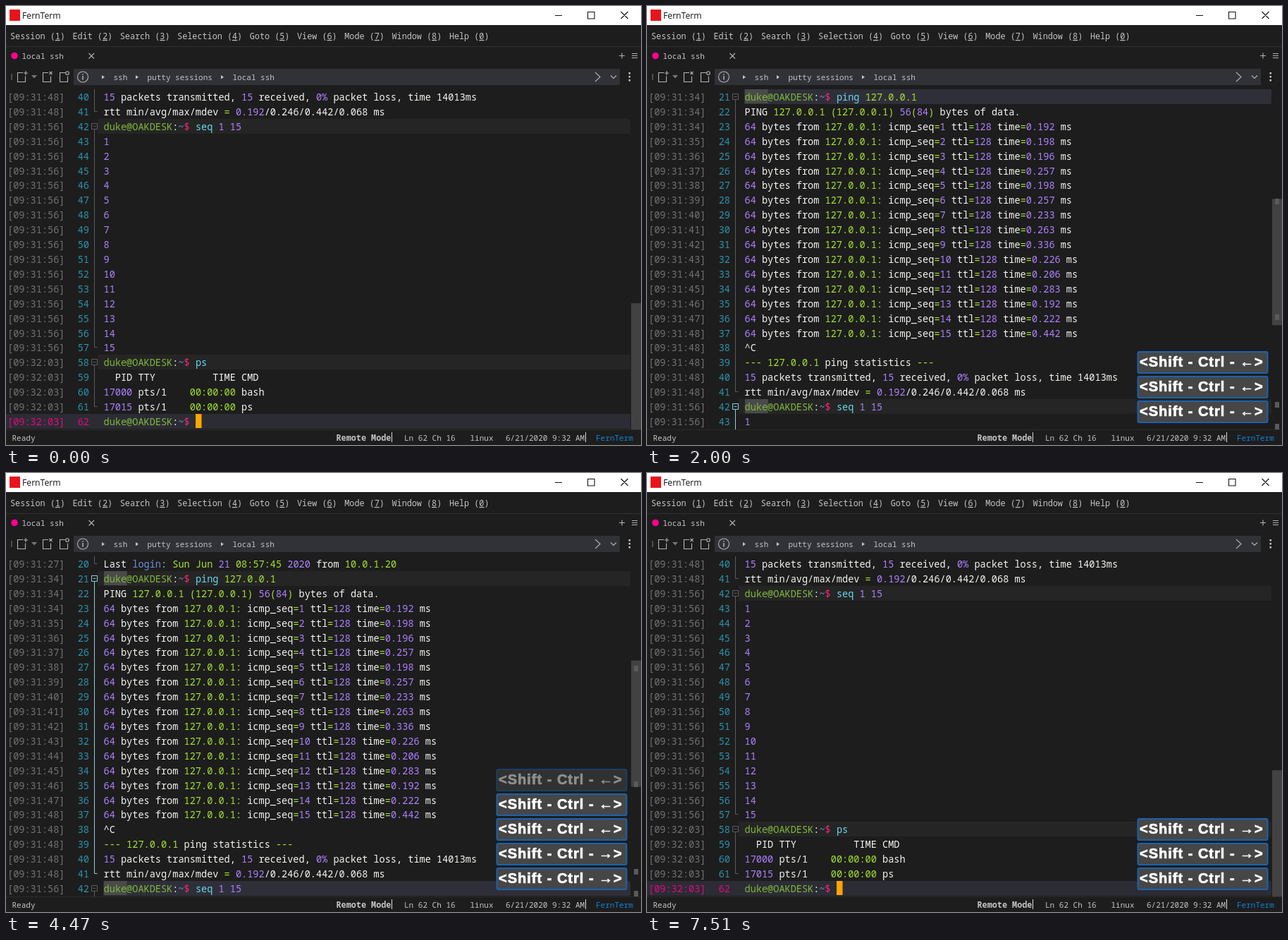
Recreate the animation shown at these times as an HTML page. Size 901 by 622 pixels, loop 7990 ms.

```html
<!DOCTYPE html>
<html lang="en">
<head>
<meta charset="utf-8">
<style>
html, body { margin: 0; width: 100%; height: 100%; overflow: hidden; background: #1d1d1d; }
svg { display: block; }
text { font-family: "Noto Sans Mono", "DejaVu Sans Mono", monospace; font-size: 11px; fill: #c4c4c4; }
.row text { font-size: 13.59px; fill: #f4f4f0; }
.row .time { fill: #727272; }
.row .num { fill: #2b93ab; text-anchor: end; }
.row .now { fill: #e5087e; }
.p { fill: #ae81ff; } .g { fill: #a6e22e; } .c { fill: #66d9ef; } .r { fill: #f04444; }
.u { fill: #7fb83a; } .b { fill: #6a8fd8; } .k { fill: #f92672; } .d { fill: #3f7d35; }
.menu text { font-size: 11.8px; }
.pop text { font: bold 20px "Liberation Sans", Arial, sans-serif; letter-spacing: 1px; fill: #fff; stroke: #fff; stroke-width: .7; }
.pop tspan { font-weight: 400; }
.line { fill: none; stroke: #b4b4b4; stroke-width: 1.1; }
</style>
</head>
<body>
<svg id="stage" width="901" height="622" viewBox="0 0 901 622"></svg>
<script>
const LOOP = 7990, TOP = 118, ROW = 20.91, CHAR = 8.155, LEFT = 139, VISIBLE = 23;
const USER = 'duke', APP = 'FernTerm';

const rect = (x, y, w, h, fill, more = '') =>
  `<rect x="${x}" y="${y}" width="${w}" height="${h}" fill="${fill}" ${more}/>`;
const path = (d, more = '') => `<path class="line" d="${d}" ${more}/>`;
const text = (x, y, s, more = '') => `<text x="${x}" y="${y}" ${more}>${s}</text>`;

// [x:words] colours the words with class x
const paint = s => s.replace(/ /g, '\u00a0').replace(/\[(\w):(.*?)\]/g, '<tspan class="$1">$2</tspan>');

const prompt = cmd => `[u:${USER}@OAKDESK]:[b:~][k:$] ${cmd}`;
const pings = [192, 198, 196, 257, 198, 257, 233, 263, 336, 226, 206, 283, 192, 222, 442];

const lines = [
  'Welcome to Ubuntu [p:18.04.2] LTS [g:(]GNU/Linux 4.4.0-18362-Microsoft x86_64[g:)]',
  '',
  ' [g:*] Documentation:  [c:https://help.ubuntu.com]',
  ' [g:*] Management:     [c:https://landscape.canonical.com]',
  ' [g:*] Support:        [c:https://ubuntu.com/advantage]',
  '',
  '  System information as of [g:Sun Jun] [p:21] [g:09:31:26] CST [p:2020]',
  '',
  '  System load:    [p:0.52]      Memory usage: [p:75%]   Processes:       [p:12]',
  '  Usage of /home: [r:unknown]   Swap usage:   [p:11%]   Users logged in: [p:0]',
  '',
  '  [g:=>] There were exceptions while processing one or more plugins. See',
  '     /var/log/landscape/sysinfo.log for more information.',
  '', '',
  '[p:156] packages [d:can be] updated.',
  '[p:87] updates are security updates.',
  '', '',
  'Last [b:login][c::] [g:Sun Jun] [p:21] [g:08:57:45] [p:2020] from [g:10.0.1.20]',
  prompt('[c:ping] [g:127.0.0.1]'),
  'PING [g:127.0.0.1 (127.0.0.1)] [p:56][g:(][p:84][g:)] bytes of data.',
  ...pings.map((ms, i) =>
    `[p:64] bytes from [g:127.0.0.1:] icmp_seq[g:=][p:${i + 1}] ttl[g:=][p:128] time[g:=][p:0.${ms}] ms`),
  '^C',
  '[g:---] [g:127.0.0.1] ping statistics [g:---]',
  '[p:15] packets transmitted, [p:15] received, [p:0%] packet loss, time 14013ms',
  'rtt min/avg/max/mdev [g:=] [p:0.192]/0.246/0.442/0.068 ms',
  prompt('[c:seq] [p:1 15]'),
  ...pings.map((_, i) => `[p:${i + 1}]`),
  prompt('[c:ps]'),
  '  PID TTY          TIME CMD',
  '[p:17000] pts/1    [g:00:00:00] bash',
  '[p:17015] pts/1    [g:00:00:00] ps',
  prompt('')
];

const prompts = [21, 42, 58, 62];
const blocks = [[1, 20], [21, 41], [42, 57], [58, 61]];

function clock(n) {
  if (n > 57) return '09:32:03';
  const s = n < 21 ? 27 : n < 24 ? 34 : n < 38 ? n + 11 : n < 42 ? 48 : 56;
  return '09:31:' + s;
}

// first: top line, sel: chosen line, fold: lit block, word: marked word,
// marks: lines on the scrollbar, keys: pressed arrows ("." before a fading one)
const steps = [
  { at: 0, first: 40, sel: 62, fold: 0, word: '', marks: [], cursor: true, keys: '' },
  { at: 530, sel: 58, fold: 58, cursor: false },
  { at: 1020, word: USER, marks: prompts, cursor: true, keys: '←' },
  { at: 1510, sel: 42, fold: 42, keys: '←←' },
  { at: 2000, first: 21, sel: 21, keys: '←←←' },
  { at: 2530, fold: 21 },
  { at: 3010, first: 1, sel: 1, fold: 1, word: 'Welcome', keys: '←←←←' },
  { at: 3500, marks: [1], keys: '.←←←←' },
  { at: 3980, sel: 21, fold: 21, word: USER, keys: '←←←→' },
  { at: 4470, first: 20, sel: 42, marks: prompts, keys: '.←←←→→' },
  { at: 5000, fold: 42, keys: '.←←→→' },
  { at: 5500, keys: '←→→' },
  { at: 6010, first: 36, sel: 58, fold: 58, keys: '.←→→→' },
  { at: 6520, keys: '→→→' },
  { at: 6990, first: 40, sel: 62, fold: 0, word: '', marks: [21, 42, 58], keys: '.→→→→' },
  { at: 7510, marks: [], keys: '→→→' }
];
steps.forEach((s, i) => steps[i] = { ...steps[i - 1], ...s });

function drawRow(n, s) {
  const y = Math.round(TOP + (n - s.first) * ROW), base = y + 15.5;
  const last = n === lines.length, isPrompt = prompts.includes(n);
  let out = '';
  if (last) out += rect(0, y, 886, 21, '#2c2c35');
  else if (n === s.sel) out += rect(LEFT - 1, y, 748, 21, '#2f2f39');
  else if (isPrompt) out += rect(LEFT - 9, y, 756, 21, '#252525');
  if (s.word && (s.word === USER ? isPrompt : n === 1))
    out += rect(LEFT, y, s.word.length * CHAR, 20, '#4a4a4a');
  out += text(2, base, `[${clock(n)}]`, `class="time ${last ? 'now' : ''}"`);
  out += text(118, base, n, `class="num ${last ? 'now' : ''}"`);
  out += text(LEFT - .5, base, paint(lines[n - 1]));
  if (last && s.cursor) out += rect(269, y, 8.5, 20, '#ffa500');
  return out;
}

function drawFold([from, to], s) {
  const mid = n => Math.round(TOP + (n - s.first) * ROW + 10) + .5;
  const a = mid(from), b = mid(to);
  return path(`M121.5 ${a - 4}h8v8h-8zM123.5 ${a}h4M125.5 ${a + 4}V${b}h4`,
    `style="stroke:${from === s.fold ? '#8ed0d4' : '#5c5c5c'};stroke-width:1"`);
}

function drawScroll(s) {
  const unit = 482 / lines.length;
  return rect(887, TOP + (s.first - 1) * unit, 14, VISIBLE * unit, '#424242') +
    s.marks.map(n => rect(891, Math.round(TOP + (n - .5) * unit - 4), 6, 8, '#5a5a5a')).join('');
}

function drawKeys(s) {
  const keys = s.keys.match(/\.?[←→]/g) || [];
  return keys.map((key, i) => {
    const y = 559 - 35 * (keys.length - 1 - i), faded = key.length > 1;
    return `<g class="pop" opacity="${faded ? .5 : 1}">` +
      rect(696.5, y + 1, 184, 30, '#464646', 'rx="2" stroke="#1c62ad" stroke-width="2"') +
      text(699, y + 22, `&lt;Shift - Ctrl - <tspan>${key.at(-1)}</tspan>&gt;`) + '</g>';
  }).join('');
}

function drawTerminal(s) {
  let rows = '';
  for (let n = s.first; n < s.first + VISIBLE; n++) rows += drawRow(n, s);
  return `<g class="row">${rows}</g>` + blocks.map(b => drawFold(b, s)).join('') + drawScroll(s) + drawKeys(s);
}

function drawFrame() {
  let x = 6;
  const menu = ['Session', 'Edit', 'Search', 'Selection', 'Goto', 'View', 'Mode', 'Window', 'Help'].map((name, i) => {
    const item = text(x, 47, `${name} (<tspan text-decoration="underline">${(i + 1) % 9}</tspan>)`);
    x += (name.length + 4) * 7.08 + 10.6;
    return item;
  }).join('');
  const doc = x => path(`M${x + 8} 94.5h-7.5v13h11v-8`) ;
  const arrow = x => `<path d="M${x - 2} 98l4 2.7l-4 2.7z" fill="#c4c4c4"/>`;

  return rect(0, 0, 901, 622, '#1d1d1d') + rect(0, 0, 901, 27, '#fff') + rect(5, 5, 15, 16, '#e8141c') +
    text(23, 18, APP, 'style="font:12.2px \'Open Sans\',\'Noto Sans\',sans-serif;fill:#111"') +
    path('M779 13.5h10M825.5 8.5h9.5v9.5h-9.5zM872.5 8l10 10m0-10l-10 10', 'style="stroke:#111"') +
    `<g class="menu">${menu}</g>` + rect(0, 57, 901, 1, '#303030') +
    '<circle cx="12" cy="70.5" r="4.8" fill="#ff0090"/>' + text(22.5, 74.5, 'local ssh') +
    path('M117.5 67l7.5 7.5m0-7.5l-7.5 7.5M870 70.5h8M874 66.5v8M888 67.5h8m-8 3h8m-8 3h8') +
    rect(96, 89, 775, 23, '#313138') + rect(7, 96, 2, 9, '#4c4c4c') +
    doc(16) + path('M28 92v6m-3-3h6') + '<path d="M36 98h8l-4 4.5z" fill="#777"/>' +
    doc(52) + path('M61.5 93l4 4m0-4l-4 4') + doc(76) +
    '<circle class="line" cx="87" cy="95" r="2.3"/><circle class="line" cx="109" cy="100.5" r="7.5"/>' +
    path('M109 99v5.5M109 96v1.5', 'style="stroke-width:1.5"') +
    [138, 186, 307].map(arrow).join('') +
    text(152.5, 104.5, 'ssh') + text(200.5, 104.5, 'putty sessions') + text(321.5, 104.5, 'local ssh') +
    path('M836 94l7 6.5l-7 6.5M858 98.5l4 4l4-4') +
    [95, 100, 105].map(y => rect(883.5, y - 1, 2.5, 2.5, '#c4c4c4')).join('') +
    '<svg id="term" y="118" width="901" height="482" viewBox="0 118 901 482"></svg>' +
    rect(0, 600, 901, 1, '#2a2a2a') + text(8.5, 615.5, 'Ready') +
    text(468.5, 615.5, 'Remote Mode', 'style="font-size:11.8px;font-weight:700"') +
    rect(547, 604, 1, 14, '#ddd') + text(565, 615.5, 'Ln 62 Ch 16') + text(658.5, 615.5, 'linux') +
    text(709, 615.5, '6/21/2020 9:32 AM') + rect(822, 604, 1, 14, '#ddd') +
    text(837, 615.5, APP, 'style="fill:#1083d6"');
}

document.getElementById('stage').innerHTML = drawFrame();
const term = document.getElementById('term');
let shown;

function tick() {
  const t = performance.now() % LOOP;
  const step = steps.findLast(s => s.at <= t);
  if (step !== shown) term.innerHTML = drawTerminal(shown = step);
  requestAnimationFrame(tick);
}
tick();
</script>
</body>
</html>
```
